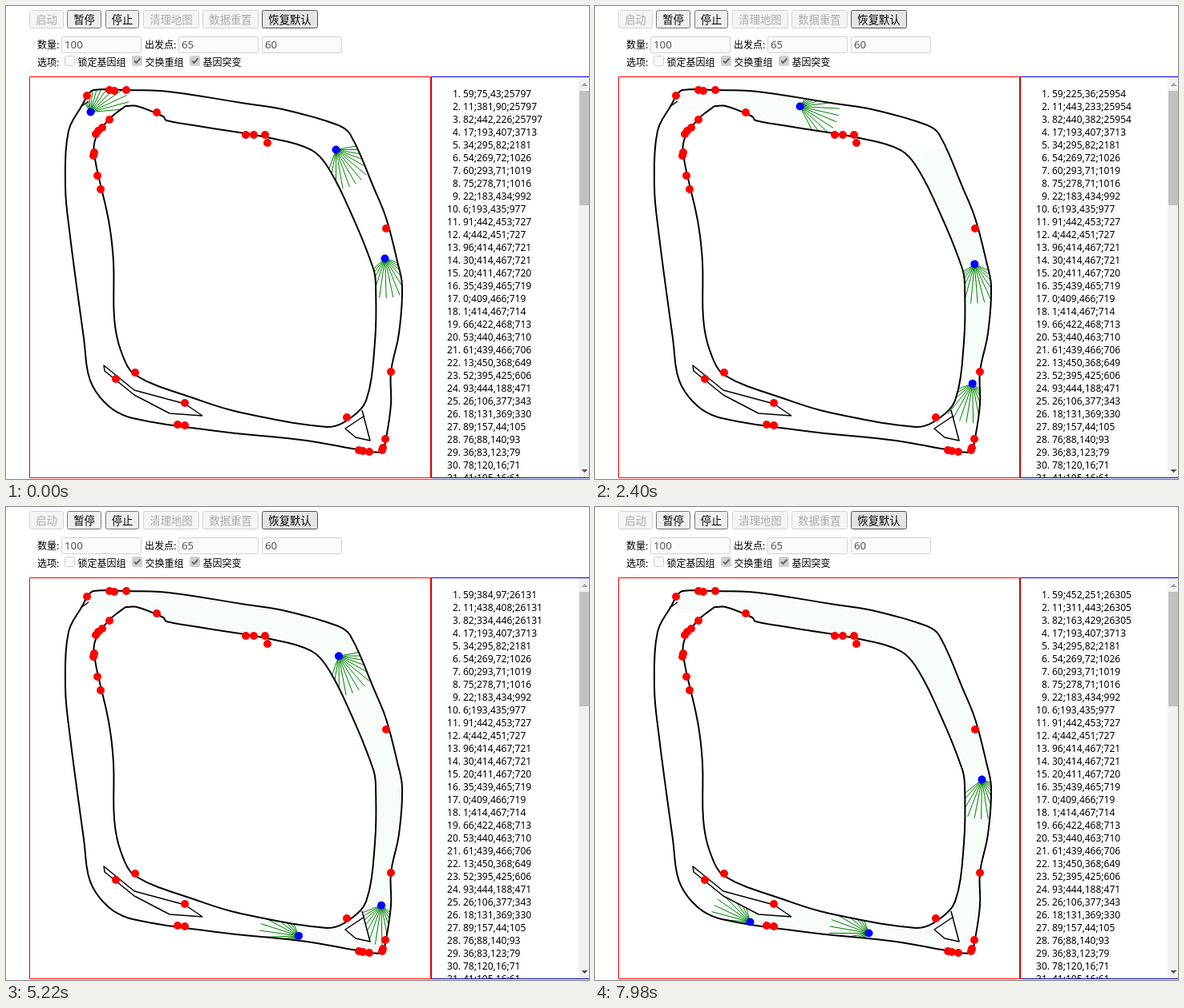
An HTML page with a canvas for the animation above (8 s loop, 727 by 591 pixels).

```html
<!DOCTYPE html>
<html lang="zh">
<head>
<meta charset="utf-8">
<style>
  html, body { margin: 0; width: 100%; height: 100%; overflow: hidden; background: #fff; }
  canvas { display: block; }
</style>
</head>
<body>
<canvas id="stage" width="727" height="591"></canvas>
<script>
const ctx = document.getElementById('stage').getContext('2d');
const LOOP = 8000, STEP = 60, STEPS = Math.ceil(LOOP / STEP);
const OX = 30.5, OY = 89.5, REACH = 49.5;
const CJK = '"Noto Sans CJK SC", "Noto Sans CJK", sans-serif';
const LATIN = '"Noto Sans", "Open Sans", sans-serif';

// Track walls: flat x, y lists in stage coordinates, drawn as smooth curves
const outer = [
  101,112, 109,105, 150,105, 203,107, 300,122, 345,129, 412,148, 429,160, 459,228, 474,265,
  488,319, 494,350, 490,409, 480,457, 480,498, 473,545, 469,557, 438,554, 375,543, 262,531,
  158,515, 128,500, 105,468, 97,415, 79,280, 74,225, 78,156, 96,122, 101,112];
const inner = [
  149,125, 163,125, 196,138, 200,143, 240,150, 330,165, 381,180, 403,204, 433,265, 458,328,
  461,348, 460,420, 449,493, 425,518, 400,526, 293,508, 237,491, 161,461, 143,430, 135,390,
  134,320, 128,268, 110,186, 112,165, 129,141, 149,125];

// Straight-edged obstacles
const sliver = [245,512, 223,497, 160,480, 122,449, 123,456, 160,486, 204,509, 245,512];
const wedge = [447,512, 423,528, 436,539, 454,543, 444,505];
const spur = [93,126, 103,119];

const crashed = [
  101,112, 129,105, 135,106, 150,105, 188,133, 129,142, 120,152, 115,156, 112,160, 110,183,
  109,187, 114,212, 118,229, 299,161, 309,161, 323,161, 326,171, 474,278, 480,457, 161,458,
  137,466, 223,496, 214,523, 223,524, 425,514, 473,541, 470,552, 469,555, 453,557, 445,556,
  440,555];

// Cars: time, x, y (map units), heading in degrees
const lead = [[0,75,43,-65], [240,84,30,-45], [480,100,25,-12], [840,128,25,2],
  [1680,181,30,-1], [3120,269,43,7], [4380,346,59,20], [5160,382,94,48],
  [6060,414,137,68], [7380,443,213,81], [7980,452,251,81]];
const second = [[0,381,90,50], [240,392,102,50], [760,409,133,62], [1680,431,190,81],
  [3120,450,276,90], [4380,443,355,99], [5500,436,426,99], [5800,436,445,130],
  [6060,429,459,187], [7380,350,449,188], [7980,311,443,190]];
const third = [[0,442,226,78], [840,451,284,90], [1680,445,338,99], [3120,436,426,99],
  [3420,436,445,130], [3680,429,459,187], [4380,387,455,188], [6060,282,438,188],
  [7380,202,430,187], [7980,163,429,195]];
const cars = [{ id: 59, keys: lead }, { id: 11, keys: second }, { id: 82, keys: third }];
const scoreKeys = [[0,25797], [1680,25909], [3120,25998], [4380,26077], [6060,26184],
  [7380,26266], [7980,26305]];

const rest = `17;193,407;3713 34;295,82;2181 54;269,72;1026 60;293,71;1019 75;278,71;1016
22;183,434;992 6;193,435;977 91;442,453;727 4;442,451;727 96;414,467;721 30;414,467;721
20;411,467;720 35;439,465;719 0;409,466;719 1;414,467;714 66;422,468;713 53;440,463;710
61;439,466;706 13;450,368;649 52;395,425;606 93;444,188;471 26;106,377;343 18;131,369;330
89;157,44;105 76;88,140;93 36;83,123;79 78;120,16;71 41;105,16;61`.split(/\s+/);

function locate(keys, t) {
  let i = 0;
  while (i < keys.length - 2 && t >= keys[i + 1][0]) i++;
  return [i, (t - keys[i][0]) / (keys[i + 1][0] - keys[i][0])];
}

function linear(keys, t, c) {
  const [i, u] = locate(keys, t);
  return keys[i][c] + (keys[i + 1][c] - keys[i][c]) * u;
}

// Cubic Hermite through unevenly spaced keys
function smooth(keys, t, c) {
  const [i, u] = locate(keys, t), last = keys.length - 1;
  const slope = k => {
    const a = keys[Math.max(k - 1, 0)], b = keys[Math.min(k + 1, last)];
    return (b[c] - a[c]) / (b[0] - a[0]);
  };
  const p = keys[i], q = keys[i + 1], d = q[0] - p[0], v = 1 - u;
  return p[c] * (1 + 2 * u) * v * v + q[c] * u * u * (3 - 2 * u)
    + d * slope(i) * u * v * v - d * slope(i + 1) * u * u * v;
}

function pairs(flat) {
  const out = [];
  for (let i = 0; i < flat.length; i += 2) out.push([flat[i], flat[i + 1]]);
  return out;
}

// Resample a point list along its chord length
function curve(flat, parts = 5) {
  let length = 0;
  const pts = pairs(flat);
  const keys = pts.map(([x, y], i) => {
    if (i) length += Math.hypot(x - pts[i - 1][0], y - pts[i - 1][1]);
    return [length, x, y];
  });
  const out = [];
  for (let i = 0; i < keys.length - 1; i++) {
    for (let k = 0; k < parts; k++) {
      const s = keys[i][0] + (keys[i + 1][0] - keys[i][0]) * k / parts;
      out.push([smooth(keys, s, 1), smooth(keys, s, 2)]);
    }
  }
  return out.concat([pts[pts.length - 1]]);
}

const walls = [curve(outer), curve(inner), pairs(sliver), pairs(wedge), pairs(spur)];
const segments = walls.flatMap(w => w.slice(1).map((p, i) => [...w[i], ...p]));
const wrecks = pairs(crashed);

function castRay(x, y, deg) {
  const dx = Math.cos(deg * Math.PI / 180), dy = Math.sin(deg * Math.PI / 180);
  let best = REACH;
  for (const [ax, ay, bx, by] of segments) {
    const ex = bx - ax, ey = by - ay, det = dx * ey - dy * ex;
    if (!det) continue;
    const r = ((ax - x) * ey - (ay - y) * ex) / det;
    const s = ((ax - x) * dy - (ay - y) * dx) / det;
    if (r > 0 && r < best && s >= 0 && s <= 1) best = r;
  }
  return [x + dx * best, y + dy * best];
}

function pose(car, t) {
  const mx = smooth(car.keys, t, 1), my = smooth(car.keys, t, 2), turn = linear(car.keys, t, 3);
  const x = mx + OX, y = my + OY, ends = [];
  for (let a = -60; a <= 60; a += 10) ends.push(castRay(x, y, turn + a));
  return { x, y, ends, label: `${car.id};${Math.round(mx)},${Math.round(my)}` };
}
const poses = Array.from({ length: STEPS }, (_, n) => cars.map(c => pose(c, n * STEP)));

function text(str, x, y, size, color = '#000', family = CJK, align = 'left') {
  ctx.font = `${size}px ${family}`;
  ctx.fillStyle = color;
  ctx.textAlign = align;
  ctx.fillText(str, x, y);
}

function rect(x, y, w, h, color) {
  ctx.fillStyle = color;
  ctx.fillRect(x, y, w, h);
}

function box(x, y, w, h, fill, stroke, radius = 2) {
  ctx.beginPath();
  ctx.roundRect(x + .5, y + .5, w - 1, h - 1, radius);
  ctx.fillStyle = fill;
  ctx.fill();
  ctx.lineWidth = 1;
  ctx.strokeStyle = stroke;
  ctx.stroke();
}

function polyline(points) {
  ctx.beginPath();
  for (const [x, y] of points) ctx.lineTo(x, y);
}

function dot(x, y, color) {
  ctx.beginPath();
  ctx.arc(x, y, 5, 0, Math.PI * 2);
  ctx.fillStyle = color;
  ctx.fill();
}

function button(label, x, w, fill, edge, color) {
  box(x, 5, w, 23, fill, edge);
  text(label, x + w / 2, 21.5, 13.333, color, CJK, 'center');
}

function field(value, x) {
  box(x, 38, 100, 21, '#fafafa', '#d2d2d2', 1);
  text(value, x + 4, 53, 13.333, '#545454', LATIN);
}

function check(label, x, on) {
  box(x, 62, 13, 13, on ? '#d0d0d0' : '#fafafa', '#cdcdcd');
  if (on) {
    polyline([[x + 3, 68.5], [x + 5.5, 71], [x + 10.5, 65.5]]);
    ctx.strokeStyle = '#666';
    ctx.lineWidth = 2;
    ctx.stroke();
  }
  text(label, x + 16.5, 75, 12);
}

function drawControls() {
  const off = ['#f5f5f5', '#d2d2d2', '#ababab'], on = ['#efefef', '#767676', '#000'];
  button('启动', 29, 43, ...off);
  button('暂停', 76, 43, ...on);
  button('停止', 124, 42, ...on);
  button('清理地图', 171, 70, ...off);
  button('数据重置', 245, 70, ...off);
  button('恢复默认', 319, 70, '#e5e5e5', '#4f4f4f', '#000');
  text('数量:', 39, 53, 12);
  field('100', 69);
  text('出发点:', 173, 53, 12);
  field('65', 215);
  field('60', 319);
  text('选项:', 39, 75, 12);
  check('锁定基因组', 73, false);
  check('交换重组', 157, true);
  check('基因突变', 229, true);
}

function drawMap(n) {
  // Faint trail left by earlier sensor fans
  ctx.fillStyle = '#f7fcf9';
  for (const p of poses.slice(0, n).flat()) {
    polyline([[p.x, p.y], ...p.ends]);
    ctx.fill();
  }
  ctx.strokeStyle = '#008000';
  ctx.lineWidth = 1;
  for (const p of poses[n]) {
    ctx.beginPath();
    for (const [x, y] of p.ends) {
      ctx.moveTo(p.x, p.y);
      ctx.lineTo(x, y);
    }
    ctx.stroke();
  }
  ctx.strokeStyle = '#000';
  ctx.lineJoin = 'round';
  walls.forEach((w, i) => {
    ctx.lineWidth = i < 2 ? 2 : 1.5;
    polyline(w);
    ctx.stroke();
  });
  for (const [x, y] of wrecks) dot(x, y, '#f00');
  for (const p of poses[n]) dot(p.x, p.y, '#00f');
  ctx.strokeStyle = '#f00';
  ctx.lineWidth = 1;
  ctx.strokeRect(29.5, 88.5, 500, 501);
}

function drawRanking(n) {
  const score = Math.round(linear(scoreKeys, n * STEP, 1));
  const rows = poses[n].map(p => `${p.label};${score}`).concat(rest);
  ctx.save();
  ctx.beginPath();
  ctx.rect(531, 89, 183, 500);
  ctx.clip();
  rows.forEach((row, i) => {
    const y = 114 + i * 16;
    text(`${i + 1}.`, 567, y, 12, '#000', LATIN, 'right');
    text(row, 570, y, 12, '#000', LATIN);
  });
  ctx.restore();

  rect(714, 89, 13, 500, '#f1f1f1');
  rect(715, 106, 12, 143, '#c1c1c1');
  for (const [y, d, color] of [[100, -4, '#a3a3a3'], [579, 4, '#505050']]) {
    polyline([[717.5, y], [725.5, y], [721.5, y + d]]);
    ctx.fillStyle = color;
    ctx.fill();
  }
  rect(530, 88, 1, 502, '#b00000');
  rect(531, 88, 196, 1, '#00f');
  rect(531, 589, 196, 1, '#0000a0');
}

const start = performance.now();
function frame() {
  const n = Math.floor(((performance.now() - start) % LOOP) / STEP);
  rect(0, 0, 727, 591, '#fff');
  drawControls();
  drawMap(n);
  drawRanking(n);
  requestAnimationFrame(frame);
}
frame();
</script>
</body>
</html>
```
